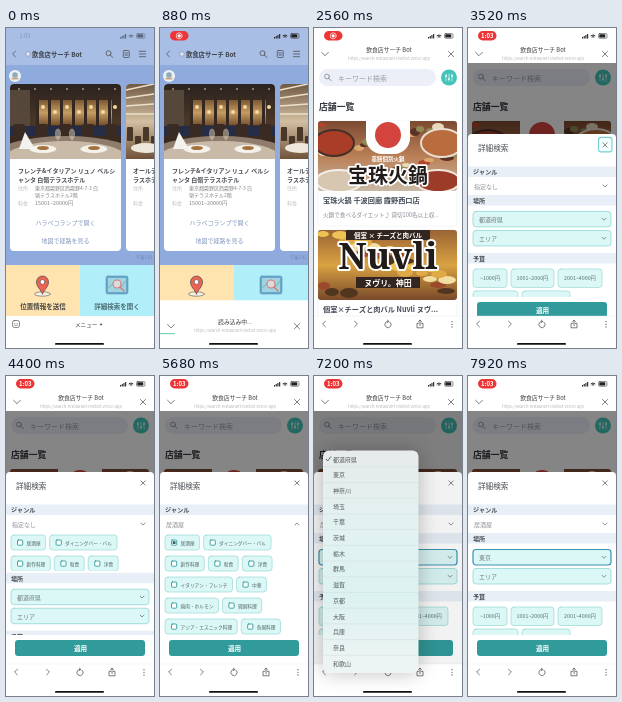
These frames come from a looping animation (148 by 320 pixels, 8 s). An HTML page with a canvas:

```html
<!DOCTYPE html>
<html lang="ja">
<head>
<meta charset="utf-8">
<title>飲食店サーチ Bot</title>
<style>
html, body { margin: 0; width: 100%; height: 100%; overflow: hidden; background: #fff; }
canvas { display: block; width: 100%; height: 100%; }
</style>
</head>
<body>
<canvas></canvas>
<script>
const W = 148, H = 320, LOOP = 8000;
const SANS = '"Noto Sans CJK JP", "Noto Sans CJK", sans-serif';
const SERIF = '"Noto Serif", serif';
const INK = '#474b52', GRAY = '#a6a8ad', TEAL = '#319b9b', MINT = '#dcf8f6', MINT_EDGE = '#86d3cf';
const canvas = document.querySelector('canvas');
const c = canvas.getContext('2d');

// Timing helpers
const progress = (t, start, length) => Math.min(1, Math.max(0, (t - start) / length));
const easeOut = p => 1 - (1 - p) ** 3;
const easeInOut = p => p * p * (3 - 2 * p);

// Drawing helpers
function rect(x, y, w, h, fill, r = 0, stroke, lw = 0.6) {
  c.beginPath();
  c.roundRect(x, y, w, h, r);
  if (fill) { c.fillStyle = fill; c.fill(); }
  if (stroke) { c.strokeStyle = stroke; c.lineWidth = lw; c.stroke(); }
}
function oval(x, y, rx, ry, fill, stroke, lw = 0.8) {
  c.beginPath();
  c.ellipse(x, y, rx, ry, 0, 0, Math.PI * 2);
  if (fill) { c.fillStyle = fill; c.fill(); }
  if (stroke) { c.strokeStyle = stroke; c.lineWidth = lw; c.stroke(); }
}
const circle = (x, y, r, fill, stroke, lw) => oval(x, y, r, r, fill, stroke, lw);
function line(points, color, lw = 0.8) {
  c.beginPath();
  points.forEach(([x, y]) => c.lineTo(x, y));
  c.strokeStyle = color;
  c.lineWidth = lw;
  c.stroke();
}
function polygon(points, fill) {
  c.beginPath();
  points.forEach(([x, y]) => c.lineTo(x, y));
  c.fillStyle = fill;
  c.fill();
}
function text(s, x, y, size, color = INK, weight = 400, align = 'left') {
  c.font = `${weight} ${size}px ${SANS}`;
  c.textAlign = align;
  c.fillStyle = color;
  c.fillText(s, x, y + size * 0.05);
}
const centered = (s, x, y, size, color, weight) => text(s, x, y, size, color, weight, 'center');
function outlined(s, x, y, size, family, lw) {
  c.font = `900 ${size}px ${family}`;
  c.textAlign = 'center';
  c.strokeStyle = '#fff';
  c.lineWidth = lw;
  c.strokeText(s, x, y);
  c.fillStyle = '#211b1a';
  c.fillText(s, x, y);
}
function clipped(x, y, w, h, draw, r = 0) {
  c.save();
  c.beginPath();
  c.roundRect(x, y, w, h, r);
  c.clip();
  draw();
  c.restore();
}
function shifted(x, y, draw) {
  c.save();
  c.translate(x, y);
  draw();
  c.restore();
}
function gradient(y0, y1, ...colors) {
  const g = c.createLinearGradient(0, y0, 0, y1);
  colors.forEach((color, i) => g.addColorStop(i / (colors.length - 1), color));
  return g;
}
const chevron = (x, y, size, color, dir = 1, lw) =>
  line([[x - size, y - dir * size / 2], [x, y + dir * size / 2], [x + size, y - dir * size / 2]], color, lw);
const angle = (x, y, dir, color) => line([[x - dir * 1.4, y - 2.8], [x + dir * 1.4, y], [x - dir * 1.4, y + 2.8]], color, 0.7);
function cross(x, y, r, color) {
  line([[x - r, y - r], [x + r, y + r]], color, 0.7);
  line([[x + r, y - r], [x - r, y + r]], color, 0.7);
}
function magnifier(x, y, r, color) {
  circle(x, y, r, null, color, 0.7);
  line([[x + r * 0.7, y + r * 0.7], [x + r * 1.7, y + r * 1.7]], color);
}

function statusBar(t) {
  const color = t < 240 ? '#59657c' : '#222';
  if (t < 240) centered('1:03', 19, 8, 5.6, '#8591a9', 500);
  else {
    rect(10, 3, 18.5, 9.5, '#ee3535', 4.7);
    if (t < 3000) {
      circle(19.2, 7.8, 3, null, '#fff', 0.7);
      circle(19.2, 7.8, 1.6, '#fff');
    } else centered('1:03', 19.2, 7.8, 6, '#fff', 600);
  }
  for (let i = 0; i < 4; i++) rect(114 + i * 1.7, 9 - i, 1.1, 1.6 + i, color);
  for (const r of [1.4, 3]) {
    c.beginPath();
    c.arc(125, 10, r, -2.3, -0.84);
    c.strokeStyle = color;
    c.lineWidth = 1;
    c.stroke();
  }
  rect(130.5, 5.5, 8.5, 4.8, null, 1.3, color, 0.5);
  rect(131.3, 6.3, 6, 3.2, color, 0.6);
}
const homeBar = () => rect(49, 315, 49, 1.8, '#111', 0.9);

function diningRoom() {
  rect(4, 56, 111, 75, gradient(56, 131, '#2b231f', '#4a3727', '#241c1a'));
  rect(4, 62, 20, 36, '#55483a');
  rect(32, 72, 74, 25, gradient(72, 97, '#7a5731', '#c69c60', '#765130'));
  for (let i = 0; i < 7; i++) {
    rect(30 + i * 12, 66, 3, 33, '#352820');
    circle(37 + i * 12, 79 + i % 2 * 5, 2, '#f5d9a0');
    circle(13 + i * 16, 61, 0.8, '#ffe9b4');
  }
  rect(4, 98, 111, 10, '#252c45');
  for (let i = 0; i < 5; i++) rect(7 + i * 23, 96, 12, 13, '#3a2a24', 2);
  oval(60, 127, 70, 19, '#8f7c6c');
  oval(60, 131, 62, 18, '#c9b9a7');
  for (const x of [37, 88]) {
    oval(x, 121, 14, 4.5, '#f5f2ec', '#b1a290', 0.5);
    oval(x, 120, 6, 2, '#a5713d');
  }
  polygon([[13, 121], [19, 104], [29, 121]], '#f3f2ef');
  for (const x of [52, 66]) {
    oval(x, 106, 2.6, 5, 'rgba(240,225,195,.45)', '#cfbd9f', 0.4);
    line([[x, 111], [x, 119]], '#d8c8ae', 0.5);
  }
}
function brightRoom() {
  rect(120, 56, 40, 75, gradient(56, 131, '#705a45', '#d2bea0', '#705239'));
  for (let i = 0; i < 4; i++) {
    line([[120, 62 + i * 8], [148, 56 + i * 10]], '#ece0c9', 1.5);
    rect(121 + i * 8, 99 + i % 2 * 9, 6, 14, '#493728', 1);
  }
  oval(140, 120, 15, 5, '#eee7dc');
}
function pin(x, y) {
  oval(x, y + 9, 8, 2.2, '#f7f1e1', '#51565d', 0.6);
  c.beginPath();
  c.moveTo(x, y + 9);
  c.bezierCurveTo(x - 2, y + 4, x - 6, y + 2, x - 6, y - 3);
  c.arc(x, y - 3, 6, Math.PI, 0);
  c.bezierCurveTo(x + 6, y + 2, x + 2, y + 4, x, y + 9);
  c.fillStyle = '#ec6350';
  c.fill();
  c.strokeStyle = '#42474d';
  c.lineWidth = 0.7;
  c.stroke();
  circle(x, y - 3, 2.4, '#fff', '#42474d', 0.6);
}
function searchMap(x, y) {
  rect(x - 11, y - 9, 22, 18, '#69a8cb', 2, '#5d91ad');
  rect(x - 9, y - 7, 18, 14, '#9fd5e3');
  line([[x - 9, y + 3], [x - 3, y - 2], [x + 3, y + 3], [x + 9, y - 4]], '#86bfbc', 1.2);
  circle(x, y - 1, 4, '#d8dce0', '#d87b74', 1.1);
  line([[x + 3, y + 2], [x + 7, y + 6]], '#d87b74', 1.4);
}

function chat() {
  rect(0, 0, W, H, '#8fabdd');
  rect(0, 0, W, 37, '#a9bee4');
  angle(8, 26, -1, '#444');
  circle(22, 26, 2.2, '#e4eaf4', '#7d8ba7', 0.6);
  text('飲食店サーチ Bot', 26, 26, 6.3, '#3c4049', 600);
  magnifier(102.5, 25.2, 2.5, '#444');
  rect(117.3, 22.5, 6, 7, null, 1, '#444', 0.7);
  for (const y of [24.7, 26, 27.3]) line([[118.7, y], [121.9, y]], '#444', 0.5);
  for (const y of [23.3, 26, 28.7]) line([[133.3, y], [139.7, y]], '#444', 0.7);
  circle(9, 48, 6, '#eef1f4');
  circle(9, 47, 2.8, '#8dabb6');
  rect(5.5, 49.5, 7, 2, '#c5a77c', 1);

  rect(4, 56, 111, 167, '#fff', 4);
  clipped(4, 56, 111, 75, diningRoom, [4, 4, 0, 0]);
  text('フレンチ&イタリアン リュノ ベルシ', 12, 142, 6, INK, 600);
  text('ャンタ 白嶺テラスホテル', 12, 151, 6, INK, 600);
  text('住所', 12, 160, 5, '#bcbec2');
  text('東京都霞野区西霞野4-7-3 白', 29, 160, 5, '#858588');
  text('嶺テラスホテル2階', 29, 167, 5, '#858588');
  text('料金', 12, 175, 5, '#bcbec2');
  text('15001~20000円', 29, 175, 5.4, '#858588');
  centered('ハラペコランプで開く', 59.5, 194, 6, '#8397bd');
  centered('地図で経路を見る', 59.5, 212, 6, '#8397bd');

  rect(120, 56, 40, 167, '#fff', 4);
  clipped(120, 56, 40, 75, brightRoom, [4, 0, 0, 0]);
  text('オールデイ', 127, 142, 6, INK, 600);
  text('ラスホテル', 127, 151, 6, INK, 600);
  text('住所', 127, 160, 5, '#bcbec2');
  text('料金', 127, 175, 5, '#bcbec2');
  text('午後1:02', 130, 229, 4.2, '#6f85b4');

  rect(0, 237, 74, 51, '#ffe4b0');
  rect(74, 237, 74, 51, '#b0effa');
  pin(36.5, 257);
  searchMap(111, 257);
  centered('位置情報を送信', 37, 278, 6.5, '#444', 600);
  centered('詳細検索を開く', 111, 278, 6.5, '#4d6b74', 600);

  rect(0, 288, W, 32, '#fff');
  rect(6.5, 292.5, 7, 7, null, 2, '#555', 0.7);
  for (const x of [8.8, 11.2]) circle(x, 295.2, 0.5, '#555');
  line([[8.5, 297.3], [11.5, 297.3]], '#555', 0.6);
  text('メニュー', 69, 296.5, 5.6, '#444', 500);
  polygon([[93.5, 295.7], [96.5, 295.7], [95, 297.7]], '#444');
}

function hotpotBanner(y) {
  rect(4, y, 139, 70, gradient(y, y + 70, '#7c4931', '#b97f56', '#c9b9a5'));
  for (let i = 0; i < 30; i++) {
    const colors = ['#b5442c', '#dda66c', '#5b3326', '#8f8a52', '#ead8bd'];
    oval(8 + i * 37 % 134, y + 4 + i * 23 % 64, 4 + i % 4, 2 + i % 3, colors[i % 5]);
  }
  oval(20, y + 22, 20, 13, '#a93d27', '#443029', 2);
  oval(128, y + 22, 21, 14, '#b96d3e', '#e8ded1', 2);
  oval(25, y + 60, 23, 11, '#d8c7b0', '#f2eee8', 2);
  oval(124, y + 60, 22, 11, '#9c3b28', '#efe7de', 2);
  rect(52, y, 44, 33, '#fff', [0, 0, 16, 16]);
  circle(74, y + 14, 13, '#d2443d');
  centered('薬膳個別火鍋', 74, y + 38, 5.5, '#fff', 700);
  outlined('宝珠火鍋', 74, y + 54, 20, SANS, 3.5);
}
function meatBanner(y) {
  rect(4, y, 139, 70, gradient(y, y + 70, '#9a6334', '#d9a242', '#79492a'));
  for (let i = 0; i < 26; i++) {
    const colors = ['#efc255', '#9d492b', '#e0aa48', '#51361f', '#f2dda2'];
    oval(9 + i * 41 % 131, y + 4 + i * 19 % 63, 6 + i % 4, 3 + i % 3, colors[i % 5]);
  }
  rect(32, y, 84, 10, '#33251f');
  centered('個室 × チーズと肉バル', 74, y + 5, 6.5, '#fff', 600);
  outlined('Nuvli', 74, y + 29, 36, SERIF, 4);
  rect(42, y + 47, 64, 11, '#33251f');
  centered('ヌヴリ。神田', 74, y + 52.5, 8, '#fff', 600);
}
function shopCard(y, title, banner, loaded) {
  rect(4, y, 139, 105, '#fff', 3, '#e6e9ec', 0.5);
  rect(4, y, 139, 70, '#edf0f2', 3);
  c.save();
  c.globalAlpha *= loaded;
  clipped(4, y, 139, 70, () => banner(y), 3);
  c.restore();
  text(title, 9, y + 78.5, 7.2, '#454c5a', 600);
}
function shopList(t) {
  rect(5, 41, 117, 17, '#eceff8', 8.5);
  magnifier(13, 48.5, 2.4, '#6d7882');
  text('キーワード検索', 24, 49.5, 7, '#969ca6');
  circle(135, 49.5, 8, '#43c4ba');
  [132, 135, 138].forEach((x, i) => {
    line([[x, 46], [x, 53]], '#fff', 0.6);
    circle(x, 48 + i % 2 * 3, 0.9, '#fff');
  });
  text('店舗一覧', 5, 78, 8.9, '#343840', 600);
  const loaded = progress(t, 1900, 240);
  shopCard(93, '宝珠火鍋 千波回廊 霞野西口店', hotpotBanner, loaded);
  text('火鍋で食べるダイエット♪ 貸切100名以上収...', 9, 187, 5.6, '#858a93');
  shopCard(202, '個室×チーズと肉バル Nuvli ヌヴ...', meatBanner, loaded);
}

function strip(label, y) {
  rect(0, y, W, 10.5, '#e9eff6');
  text(label, 5, y + 5.3, 6.1, INK, 600);
}
function select(label, y, focused) {
  rect(5, y, 138, 15.5, MINT, 3, focused ? '#3993b3' : MINT_EDGE, focused ? 1.2 : 0.7);
  text(label, 11, y + 7.8, 6, '#6b777c');
  chevron(136, y + 7.8, 2, '#687b80');
}
function genreChips(checked) {
  const names = ['居酒屋', 'ダイニングバー・バル', '創作料理', '和食', '洋食', 'イタリアン・フレンチ', '中華',
    '焼肉・ホルモン', '韓国料理', 'アジア・エスニック料理', '各国料理'];
  let x = 5, y = 63;
  for (const name of names) {
    const width = 20.5 + name.length * 4.7;
    if (x + width > 143) { x = 5; y += 21; }
    rect(x, y, width, 15, MINT, 3, MINT_EDGE);
    rect(x + 6.5, y + 5, 5.2, 5.2, '#fff', 0.8, TEAL, 0.9);
    if (checked && name === '居酒屋') rect(x + 7.7, y + 6.2, 2.8, 2.8, '#23656a');
    text(name, x + 15.5, y + 7.6, 4.7, '#4f6265');
    x += width + 4;
  }
}
function budgetChips(y) {
  const chip = (label, x, top, width) => {
    rect(x, top, width, 18.5, MINT, 3, MINT_EDGE);
    centered(label, x + width / 2, top + 9.2, 5.3, '#5d7275');
  };
  chip('~1000円', 5, y, 34);
  chip('1001~2000円', 43, y, 43);
  chip('2001~4000円', 90, y, 44);
  chip('4001~6000円', 5, y + 22, 45);
  chip('6001~8000円', 54, y + 22, 48);
}
function searchPanel(t) {
  const open = easeInOut(progress(t, 4320, 240)) - easeInOut(progress(t, 6040, 240));
  const expanded = 150 * open;
  rect(0, 0, W, 230, '#fff', 4);
  text('詳細検索', 10, 13.5, 7.6);
  if (t < 4240) rect(130.5, 3.5, 13.5, 14.5, '#f4ffff', 2.5, '#72cfd4', 1.1);
  cross(137, 11, 2.2, '#555');
  clipped(0, 20, W, 144, () => {
    strip('ジャンル', 32.5);
    text(t > 5200 ? '居酒屋' : '指定なし', 6, 52, 6, '#8b8f95');
    chevron(137, 52, 2.2, '#777', open > 0.5 ? -1 : 1);
    clipped(0, 59, W, expanded, () => genreChips(t > 5200));
    shifted(0, expanded, () => {
      strip('場所', 61);
      select(t > 7440 ? '東京' : '都道府県', 77.5, t > 6560);
      select('エリア', 96.5);
      strip('予算', 119);
      budgetChips(135);
    });
  });
  rect(0, 163, W, 67, '#fff');
  rect(9, 168, 130, 16, TEAL, 3);
  centered('適用', 74.5, 176, 6.6, '#fff', 700);
}

function prefectureMenu(t) {
  const shown = easeOut(progress(t, 6640, 280)) * (1 - easeInOut(progress(t, 7520, 200)));
  if (!shown) return;
  const names = '都道府県 東京 神奈川 埼玉 千葉 茨城 栃木 群馬 滋賀 京都 大阪 兵庫 奈良 和歌山'.split(' ');
  const scale = 0.4 + 0.6 * shown, pitch = 15.7;
  c.save();
  c.globalAlpha = shown;
  rect(0, 35, W, 253, 'rgba(0,0,0,.05)');
  c.translate(56, 181);
  c.scale(scale, scale);
  c.translate(-56, -181);
  c.shadowColor = 'rgba(0,0,0,.25)';
  c.shadowBlur = 20;
  rect(9, 74.5, 95.5, 222.5, gradient(74, 297, '#e7eaea', '#e2f2f1', '#dcf2f0', '#eff4f4'), 6);
  c.shadowColor = 'transparent';
  names.forEach((name, i) => {
    const y = 83 + i * pitch;
    text(name, 19, y, 6, '#50575a');
    if (i) line([[9, y - pitch / 2], [104.5, y - pitch / 2]], '#cbd5d5', 0.4);
  });
  const y = t > 7440 ? 83 + pitch : 83;
  line([[12, y], [13.7, y + 2], [16.7, y - 2.3]], '#454b4e');
  c.restore();
}

function toolbar() {
  rect(0, 288, W, 32, '#fff');
  line([[0, 288], [W, 288]], '#e4e4e4', 0.4);
  angle(10, 296, -1, '#444');
  angle(42, 296, 1, '#444');
  c.beginPath();
  c.arc(74, 296.5, 3.1, -0.9, 4.8);
  c.strokeStyle = '#444';
  c.lineWidth = 0.7;
  c.stroke();
  line([[73.2, 292.1], [74.8, 293.4], [73.2, 294.8]], '#444', 0.6);
  line([[104.8, 295.3], [103, 295.3], [103, 299.8], [109, 299.8], [109, 295.3], [107.2, 295.3]], '#444', 0.7);
  line([[106, 297.8], [106, 292.3]], '#444', 0.7);
  chevron(106, 292.8, 1.4, '#444', -1, 0.7);
  for (const y of [293.7, 296.3, 298.9]) circle(138, y, 0.6, '#444');
}

function browser(t) {
  rect(0, 0, W, H, '#fff');
  chevron(11, 26, 3.4, '#444', 1, 0.7);
  centered(t < 1520 ? '読み込み中...' : '飲食店サーチ Bot', 75, 21, 5.8, '#3a3a3a', 500);
  centered('https://search-restaurant-linebot.vercel.app', 75, 30, 4, '#b4b5b8');
  cross(137, 26, 2.6, '#444');
  if (t < 1680) rect(0, 33, 15 + 133 * easeInOut(progress(t, 960, 640)), 0.9, '#58c9a4');
  else {
    c.save();
    c.globalAlpha = progress(t, 1680, 160);
    shopList(t);
    c.restore();
  }
  const raise = progress(t, 3270, 400);
  if (raise) {
    rect(0, 35, W, 253, `rgba(0,0,0,${0.48 * Math.min(1, raise * 1.6)})`);
    shifted(0, 96 + 192 * (1 - easeOut(raise)), () => searchPanel(t));
  }
  toolbar();
  prefectureMenu(t);
}

function render(t) {
  const rise = easeInOut(progress(t, 764, 480));
  if (rise < 1) chat();
  if (rise > 0) shifted(0, (1 - rise) * H, () => browser(t));
  statusBar(t);
  homeBar();
}

function frame(now) {
  const ratio = window.devicePixelRatio || 1;
  const width = Math.round(innerWidth * ratio), height = Math.round(innerHeight * ratio);
  if (canvas.width !== width || canvas.height !== height) {
    canvas.width = width;
    canvas.height = height;
  }
  c.setTransform(width / W, 0, 0, height / H, 0, 0);
  c.textBaseline = 'middle';
  c.lineCap = c.lineJoin = 'round';
  render(now % LOOP);
  requestAnimationFrame(frame);
}
requestAnimationFrame(frame);
</script>
</body>
</html>
```
